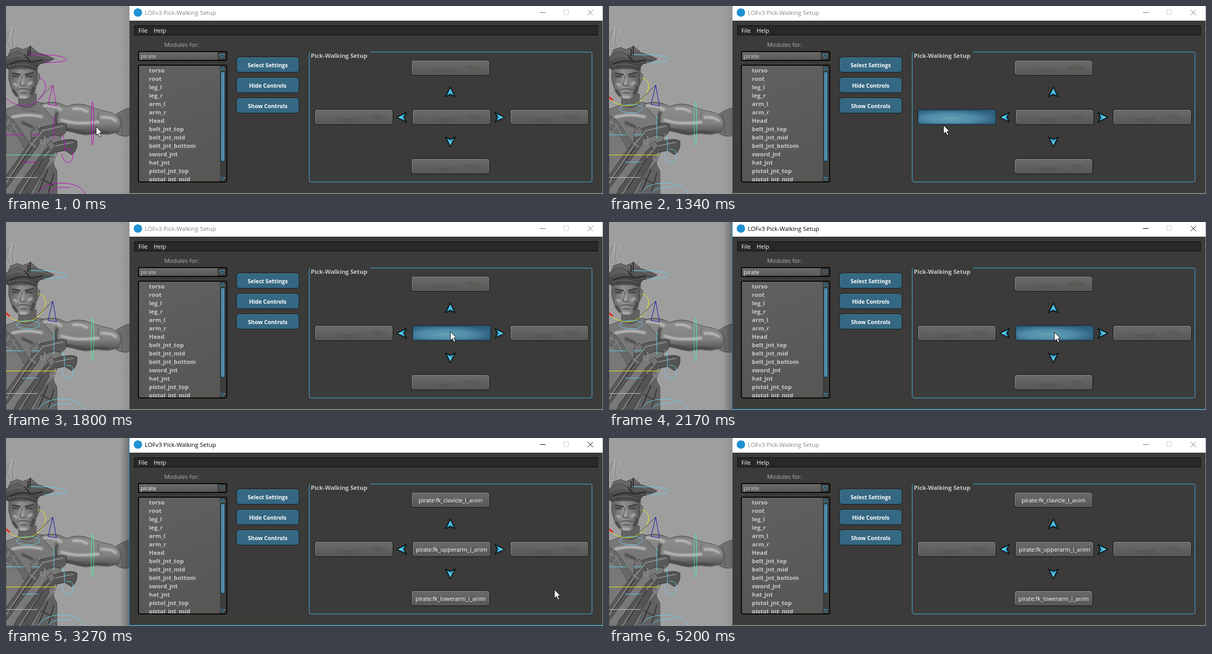
An HTML page for the animation above (5.3 s loop, 1136 by 359 pixels).

```html
<!DOCTYPE html>
<html lang="en">
<head>
<meta charset="utf-8">
<title>Pick-Walking Setup</title>
<style>
html, body { margin: 0; width: 100%; height: 100%; overflow: hidden; background: #9e9e9e; }
svg { display: block; width: 1136px; height: 359px; font: 11px "Open Sans", "Noto Sans", sans-serif; }
.bold { font-weight: 700; font-size: 11.3px; fill: #c9c9c9; }
.mid { text-anchor: middle; }
.line { fill: none; stroke-width: 1; }
.rig * { fill: none; stroke: #c000c0; }
.rig .edge { stroke: #4c344c; }
.rig .main { stroke: #4fe8a0; }
.rig .extra { visibility: hidden; }
.picked .rig * { stroke: #63d2f0; }
.picked .rig .main, .picked .rig .neck { stroke: #f4ec00; }
.picked .rig .axis { stroke: #1414b4; }
.picked .rig .edge { stroke: #333; }
.picked .rig .arm { stroke: #4cf0a0; }
.picked .rig .extra { visibility: visible; }
.picked .rig .red { stroke: #e02020; stroke-width: 3; }
.caption { fill: #858585; font-size: 11.4px; }
.glyph { stroke: #6e6e6e; }
.active .caption { fill: #000; }
.active .glyph { stroke: #000; }
.combo { fill: #d0d0d0; }
.active .combo { fill: #fff; }
.drop { fill: #29444f; stroke: #4a9abb; }
.active .drop { fill: #3d484c; stroke: #40687a; }
.rim { fill: #686868; }
.active .rim { fill: #1f86c8; }
.side { fill: #1f86c8; visibility: hidden; }
.active .side { visibility: visible; }
.shade { opacity: .25; }
.active .shade { opacity: 1; }
.slot .hot, .label { visibility: hidden; }
.slot.over .hot, .named .label { visibility: visible; }
</style>
</head>
<body>
<svg id="stage" viewBox="0 0 1136 359">
<defs>
  <linearGradient id="skin" x2="0" y2="1">
    <stop offset="0" stop-color="#747474"/><stop offset=".2" stop-color="#8a8a8a"/>
    <stop offset=".65" stop-color="#828282"/><stop offset="1" stop-color="#4e4e4e"/>
  </linearGradient>
  <linearGradient id="face"><stop offset="0" stop-color="#5d5d5d"/><stop offset=".4" stop-color="#909090"/><stop offset=".7" stop-color="#7c7c7c"/><stop offset="1" stop-color="#505050"/></linearGradient>
  <linearGradient id="hat" x2="0" y2="1"><stop offset="0" stop-color="#636363"/><stop offset="1" stop-color="#3b3b3b"/></linearGradient>
  <linearGradient id="slot" x2="0" y2="1"><stop offset="0" stop-color="#6b6b69"/><stop offset="1" stop-color="#575755"/></linearGradient>
  <radialGradient id="hot" cx=".42" cy=".6" r=".6"><stop offset="0" stop-color="#62a2b4"/><stop offset=".55" stop-color="#4f8aa8"/><stop offset="1" stop-color="#2f607f"/></radialGradient>
  <linearGradient id="list" x2=".3" y2="1"><stop offset="0" stop-color="#616160"/><stop offset="1" stop-color="#575755"/></linearGradient>
  <linearGradient id="arrow" x2="0" y2="1"><stop offset="0" stop-color="#8be6fb"/><stop offset="1" stop-color="#1493c6"/></linearGradient>
  <linearGradient id="shadow"><stop offset="0" stop-color="#000" stop-opacity="0"/><stop offset="1" stop-color="#000" stop-opacity=".3"/></linearGradient>
  <clipPath id="listClip"><path d="M252 113H407V335H252Z"/></clipPath>
  <filter id="soft" x="-20%" y="-40%" width="140%" height="180%"><feGaussianBlur stdDeviation="1.8"/></filter>
</defs>

<rect width="236" height="359" fill="#9e9e9e"/>

<g stroke="#3e3e3e" stroke-width=".8" stroke-linejoin="round">
  <path d="M0 47 11 40 18 44 14 62 17 80H0Z" fill="#949494" stroke="#bababa"/>
  <path d="M2 78 11 42 8 78" fill="none" stroke="#c8c8c8"/>
  <!-- torso and arm -->
  <path d="M0 197Q22 190 30 183H56Q68 184 88 190L104 200V262L90 300 97 359H0Z" fill="#787878"/>
  <path d="M202 213Q216 199 236 194V247Q224 252 210 244Z" fill="#707070"/>
  <path d="M204 214Q212 222 213 242M214 207Q224 222 220 246" fill="none" stroke="#4b4b4b"/>
  <path d="M66 187Q92 178 116 192 132 184 152 189 168 196 184 200 205 202 215 213 221 226 214 240 194 248 172 242 150 249 128 241 106 238 96 222Z" fill="url(#skin)"/>
  <g filter="url(#soft)" fill="none">
    <path d="M104 217Q134 228 178 221M126 196Q146 194 156 203M180 213Q198 210 210 220M10 213Q38 204 70 212M70 191Q90 188 106 199" stroke="#b9b9b9" stroke-width="5"/>
    <path d="M106 234Q136 238 152 244 176 238 196 243M98 202Q92 218 98 232M30 222 52 232" stroke="#484848" stroke-width="5"/>
  </g>
  <path d="M96 195Q87 218 104 238M128 241Q150 232 175 241M178 201Q168 213 182 223M64 203Q40 200 28 196" fill="none" stroke="#505050"/>
  <!-- head -->
  <path d="M24 168H58L57 188Q42 200 24 190Z" fill="#626262"/>
  <path d="M6 111H60L59 145 54 167Q45 180 31 178 16 175 10 157L5 139Z" fill="url(#face)"/>
  <path d="M59 128Q66 127 64 139L58 151Z" fill="#767676"/>
  <g filter="url(#soft)" fill="none" stroke-width="4">
    <path d="M14 148 22 152M42 150 50 145M30 137V150M26 174H40" stroke="#b4b4b4"/>
    <path d="M11 134H25M37 134H51M13 160 22 172M53 154 47 170M8 118H58" stroke="#3d3d3d"/>
  </g>
  <path d="M11 128 28 131M36 131 53 127" stroke="#393939" stroke-width="2.5"/>
  <path d="M31 133 27 151 33 153 38 150M21 160Q33 156 46 160M27 166H40" fill="none" stroke="#4c4c4c" stroke-width="1.4"/>
  <!-- hat -->
  <path d="M2 100 9 83 22 79 32 83 47 77 58 86 66 101Z" fill="#696969"/>
  <path d="M0 98Q12 86 24 87L36 93 51 87Q70 90 92 101 80 108 64 111L56 123Q30 109 5 121L0 118Z" fill="url(#hat)"/>
  <path d="M0 103Q16 90 36 97L53 91 84 101M4 117Q30 104 56 118" fill="none" stroke="#7e7e7e"/>
  <path d="M8 111Q28 101 48 107L70 103M36 94 46 106M42 96V82M46 96V76" fill="none" stroke="#262626" stroke-width="2"/>
  <!-- belts and pistols -->
  <path d="M0 209 13 216 25 233 39 253 47 263 37 275 21 253 0 235Z" fill="#686868"/>
  <path d="M0 220 13 227 26 249M0 238 16 246 30 267M8 214 0 229M18 224 8 240" fill="none" stroke="#aaa"/>
  <path d="M115 226Q109 222 94 226L67 232 54 242 45 261 0 324V349L58 271 69 254 90 246 106 249Q119 239 115 226Z" fill="#5a5a5a" stroke="#262626"/>
  <path d="M109 229 70 238 52 260 0 338M57 270 45 260M68 254Q61 264 72 263 76 256 73 249" fill="none" stroke="#8d8d8d" stroke-width="2"/>
  <path d="M135 258Q126 252 106 257L86 263 72 277 20 347 15 359H46L84 292 91 280 112 276 125 284Q137 275 135 258Z" fill="#545454" stroke="#262626"/>
  <path d="M128 260 91 268 75 285 25 359M87 285Q79 295 91 294 97 287 94 279" fill="none" stroke="#8a8a8a" stroke-width="2"/>
  <path d="M47 240 58 231 65 239 59 250 48 252ZM78 265 86 257 94 266 86 277Z" fill="#737373" stroke="#2c2c2c"/>
  <path d="M74 314 89 300 97 315 97 359H52Z" fill="#626262"/>
  <path d="M80 312 62 355M91 319 80 359M66 329 91 343M50 268 6 332M72 290 34 350" fill="none" stroke="#333" stroke-width="2"/>
</g>

<g class="rig line">
  <path d="M45 93Q109 92 115 102 113 108 72 108"/>
  <path class="neck" d="M62 137C80 142 79 160 65 177 49 195 20 195 0 176"/>
  <ellipse class="extra" cx="42" cy="196" rx="22" ry="8"/>
  <path class="edge" d="M60 179 89 151"/>
  <path class="axis" d="M89 151 96 191 80 188Z"/>
  <path class="extra red" d="M0 174 7 180"/>
  <path d="M91 210V253M0 246H34M47 246H64M30 298H61"/>
  <path class="main" d="M0 284.5H95"/>
  <ellipse class="arm" cx="164.5" cy="224.5" rx="2.5" ry="41"/>
  <path d="M106 245Q113 251 111 277M114 274Q126 272 128 282 128 299 117 299 108 296 106 282"/>
  <path d="M62 357Q70 339 107 338 141 339 151 359M80 357Q92 343 123 347"/>
</g>
<path d="M0 327.5H60" stroke="#c9c9c9"/>

<rect class="shade" x="217" width="18" height="359" fill="url(#shadow)"/>
<g id="window"></g>
<path id="cursor" d="M.5.5V17L4.4 13.4 7.3 20 10 18.8 7.1 12.4H12Z" fill="#fff" stroke="#000" stroke-width=".9"/>
</svg>

<script>
const stage = document.getElementById('stage'), cursor = document.getElementById('cursor');
const box = (x, y, w, h, fill, r = 0, stroke = 'none', sw = 1) =>
  `<rect x="${x}" y="${y}" width="${w}" height="${h}" rx="${r}" fill="${fill}" stroke="${stroke}" stroke-width="${sw}"/>`;
const text = (x, y, s, cls = '', attrs = '') => `<text x="${x}" y="${y}" class="${cls}" ${attrs}>${s}</text>`;
const path = (d, fill, stroke = 'none', attrs = '') => `<path d="${d}" fill="${fill}" stroke="${stroke}" ${attrs}/>`;

const rows = ['torso', 'root', 'leg_l', 'leg_r', 'arm_l', 'arm_r', 'Head', 'belt_jnt_top', 'belt_jnt_mid',
  'belt_jnt_bottom', 'sword_jnt', 'hat_jnt', 'pistol_jnt_top', 'pistol_jnt_mid'];
const slots = [
  [771, 103, 'pirate:fk_clavicle_l_anim'], [587, 197, ''], [773, 197, 'pirate:fk_upperarm_l_anim'],
  [959, 197, ''], [771, 291, 'pirate:fk_lowerarm_l_anim']];

const button = (y, s) => box(438.5, y + .5, 119, 29, '#356883', 5, '#101a20') +
  path(`M443 ${y + 1.5}H553`, 'none', '#4d809b') + text(498, y + 20, s, 'bold mid', 'style="fill:#fff;font-size:10.5px"');

const slot = ([x, y, s]) => `<g class="slot">` +
  box(x + .5, y + .5, 149, 29, 'url(#slot)', 4, '#111') +
  path(`M${x + 1.5} ${y + 26}v-21q0-3.5 3.5-3.5h140`, 'none', '#8d8d8b') +
  path(`M${x + 38} ${y + 22}q14-9 25-4l14-3 8 6-18 4zm62-7q16-7 27-2l8 5-15 2z`, '#4d4d4b', 'none', 'opacity=".35"') +
  `<g class="hot">${box(x + .5, y + .5, 149, 29, 'url(#hot)', 4, '#16222c')}` +
  `${box(x + 2, y + 2, 146, 26, 'none', 3, '#28506c80', 2)}</g>` +
  text(x + 75, y + 20, s, 'mid label', 'fill="#fff" style="font-size:10.9px;font-weight:500"') + '</g>';

const arrow = (x, y, turn) => path('M0-8.5 8.5 8 0 4-8.5 8Z', 'url(#arrow)', '#0a1419',
  `stroke-width="1.8" stroke-linejoin="round" transform="translate(${x} ${y}) rotate(${turn}) scale(1.08)"`);

document.getElementById('window').innerHTML =
  box(235, 0, 900, 28, '#fff') + box(235, 28, 900, 329, '#3b3b39') +
  box(235, 358, 901, 1, '#9e9e9e') + box(1135, 0, 1, 359, '#9e9e9e') +
  `<path class="rim" d="M234 357h901v1H234z"/><path class="side" d="M234 0h1v358h-1z"/>` +
  `<circle cx="251" cy="12.5" r="8" fill="#1e92d2"/>` +
  text(264, 17, 'LOFv3 Pick-Walking Setup', 'caption') +
  `<path class="glyph line" d="M1016 12.5h11M1107 7.5l10 10m0-10l-10 10"/>` +
  box(1061.5, 7.5, 9, 9, 'none', 0, '#d0d0d0') +
  box(244.5, 37.5, 881, 18, '#282828', 0, '#0c0c0c') +
  text(252, 51, 'File', '', 'fill="#fff"') + text(281, 51, 'Help', '', 'fill="#fff"') +
  text(334, 78, 'Modules for:', 'mid', 'fill="#b5b5b5" style="font-size:11.2px"') +
  box(252, 87, 168, 17, 'url(#slot)', 2, '#080808', 2) + text(256, 100, 'pirate', 'combo') +
  box(403.5, 88.5, 15, 14, '#484848', 0, '#222') +
  '<path class="drop" d="M406.5 92.5h9l-4.5 7z"/>' +
  box(252, 113, 168, 223, 'url(#list)', 3, '#080808', 2) +
  `<g clip-path="url(#listClip)">${rows.map((s, i) => text(272, 127 + 16 * i, s, 'bold')).join('')}</g>` +
  box(407, 114, 12, 221, '#3e3e3c') + box(408.5, 125.5, 8, 171, '#4e89a8', 3, '#10202a') +
  path('M408.5 122l4-6 4 6zM408.5 327.5l4 6 4-6z', '#29444f', '#4a9abb') +
  button(97, 'Select Settings') + button(136, 'Hide Controls') + button(175, 'Show Controls') +
  box(577, 88, 538, 248, 'none', 4, '#427996', 2) + box(579, 84, 114, 8, '#3b3b39') +
  text(580, 99, 'Pick-Walking Setup', 'bold') + slots.map(slot).join('') +
  arrow(845.5, 164.5, 0) + arrow(753, 212.5, -90) + arrow(939.5, 212.5, 90) + arrow(845.5, 259, 180);

// [ms, x, y]: the pointer is sampled and held at each step
const moves = [[0, 171, 230], [120, 173, 232], [240, 175, 231], [370, 173, 217], [490, 168, 202], [610, 166, 194],
  [1220, 410, 218], [1340, 636, 227], [1460, 750, 230], [1580, 820, 218], [1700, 844, 210], [1800, 845, 209],
  [2170, 847, 210], [3150, 962, 258], [3270, 1043, 289], [4490, 1043, 290], [4730, 1064, 326], [4850, 1080, 370]];
const groups = [...document.querySelectorAll('.slot')];

function draw(now) {
  const t = now % 5300;
  const [, x, y] = moves.findLast(m => m[0] <= t);
  cursor.setAttribute('transform', `translate(${x} ${y})`);
  stage.classList.toggle('picked', t >= 850);
  stage.classList.toggle('active', t >= 2170 && t < 5200);
  stage.classList.toggle('named', t >= 2290);
  groups.forEach((g, i) => {
    const [left, top] = slots[i];
    g.classList.toggle('over', x >= left && x < left + 150 && y >= top && y < top + 31);
  });
}
const start = performance.now();
function tick() {
  draw(performance.now() - start);
  requestAnimationFrame(tick);
}
tick();
</script>
</body>
</html>
```
